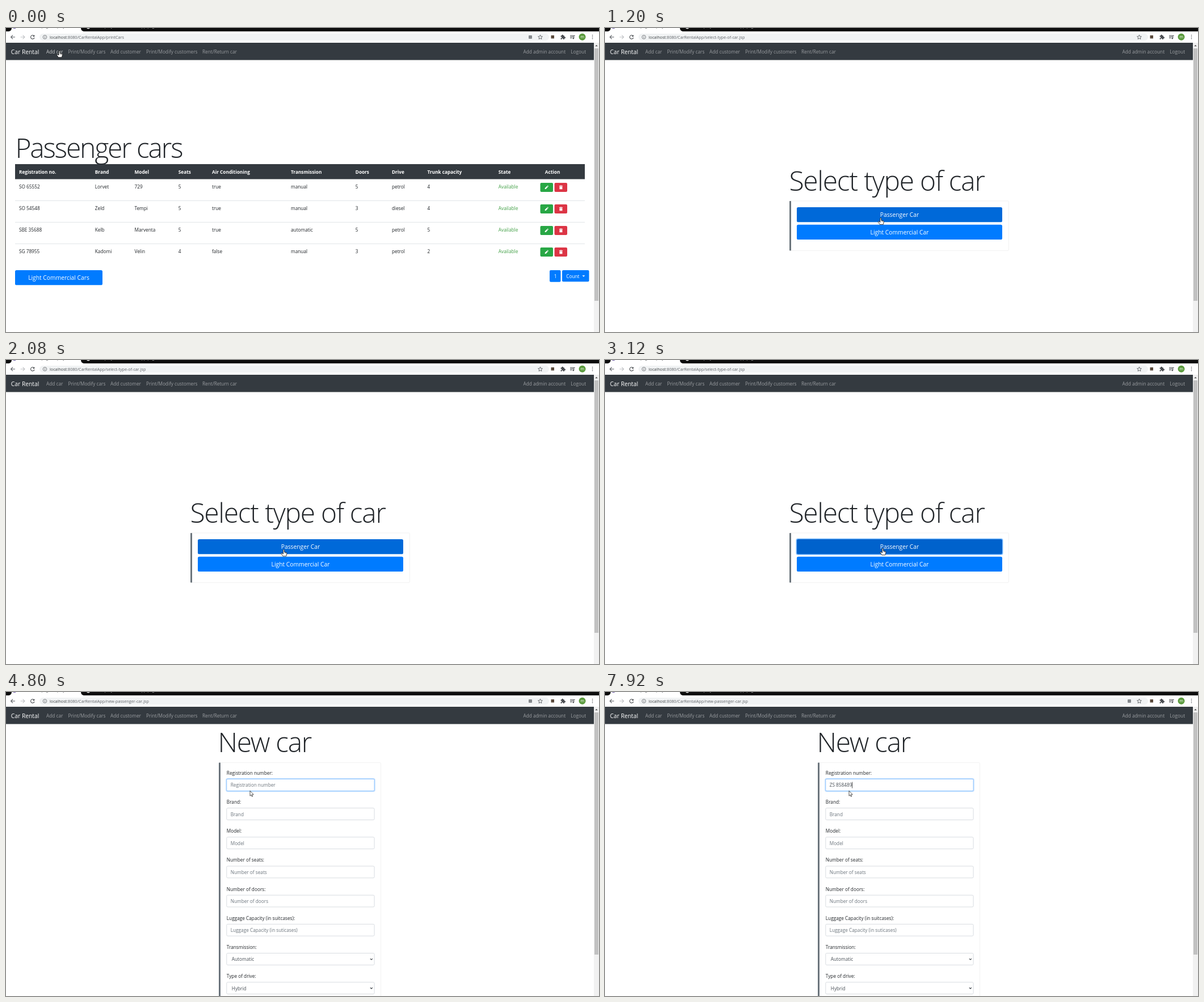
Write an HTML page that moves like this. It is 1045 by 536 pixels and loops after 8000 ms.

```html
<!DOCTYPE html>
<html lang="en">
<head>
<meta charset="utf-8">
<title>Car Rental</title>
<style>
html, body { margin: 0; width: 100%; height: 100%; overflow: hidden; background: #fff; }
svg { display: block; width: 100%; height: 100%; }
text { font: 8.25px "Open Sans", "Noto Sans", sans-serif; fill: #212529; white-space: pre; }
.big { font-size: 48px; font-weight: 300; letter-spacing: -.028em; }
.tight { letter-spacing: -.046em; }
.lg { font-size: 10.3px; }
.url { font-size: 7.2px; }
.bold { font-weight: 700; }
.mid { text-anchor: middle; }
</style>
</head>
<body>
<svg id="stage" viewBox="0 0 1045 536" preserveAspectRatio="none"></svg>
<script>
const LOOP = 8000, STEP = 80;
const BLUE = '#007bff', GREY = '#5f6368', ICON = '#4a4d51';

const rect = (x, y, w, h, fill, r = 0, extra = '') =>
  `<rect x="${x}" y="${y}" width="${w}" height="${h}" rx="${r}" fill="${fill}" ${extra}/>`;
const text = (x, y, str, fill = '#212529', cls = '', extra = '') =>
  `<text x="${x}" y="${y}" class="${cls}" style="fill:${fill}" ${extra}>${str}</text>`;
const line = (d, color, w = 1, extra = '') =>
  `<path d="${d}" fill="none" stroke="${color}" stroke-width="${w}" ${extra}/>`;
const shape = (d, fill, extra = '') => `<path d="${d}" fill="${fill}" ${extra}/>`;
const dot = (x, y, r, fill, extra = '') => `<circle cx="${x}" cy="${y}" r="${r}" fill="${fill}" ${extra}/>`;
const group = (id, body) => `<g id="${id}">${body}</g>`;

function browser() {
  return rect(0, 0, 1045, 6, '#0b0b0b') +
    shape('M5 6Q10 5 10 0H132Q132 5 137 6Z', '#fff') +
    group('favicon', dot(15, -2, 3.2, '#7d6bb0')) +
    text(24, -.6, 'Car Rental, page display', '#3c4043', 'url') +
    dot(145, -2, 3.4, '#fff') +
    text(157, -.6, 'Web project, car rental app page', '#ddd', 'url') +
    rect(0, 6, 1045, 20, '#fff') +
    rect(59, 10, 898, 12, '#f1f3f4', 6) +
    line('M16 16H8.8M12 12.6L8.6 16L12 19.4', GREY, 1.1) +
    line('M25.6 16H32.8M29.6 12.6L33 16L29.6 19.4', '#c0c2c5', 1.1) +
    group('reload', line('M49.4 14A3.3 3.3 0 1 0 50 17', ICON, 1.1) + shape('M50.3 11.9V15.3H46.9Z', ICON)) +
    group('stop', line('M43.6 12.8L50 19.2M50 12.8L43.6 19.2', ICON, 1.1)) +
    dot(68.5, 16, 3.3, 'none', `stroke="${GREY}" stroke-width=".8"`) +
    line('M68.5 15.4V17.9M68.5 13.8V14.7', GREY, .8) +
    text(77, 18.5, '<tspan>localhost</tspan><tspan id="path" fill="#5f6368"></tspan>', '#3c4043', 'url') +
    group('translate', rect(921, 13, 6, 6, '#85898d', 1)) +
    line('M941.5 12.2L942.6 14.8L945.4 15L943.3 16.9L943.9 19.6L941.5 18.2L939.1 19.6L939.7 16.9L937.6 15L940.4 14.8Z', ICON, .8) +
    rect(960.5, 13, 5.5, 5.5, '#5a4a3c') +
    shape('M977.6 13.6H979.4A1.4 1.4 0 1 1 982 13.6H984V15.7A1.4 1.4 0 1 1 984 18.2V20H981.8A1.2 1.2 0 1 0 979.6 20H977.6V17.8A1.2 1.2 0 1 0 977.6 15.7Z', ICON) +
    line('M994 13.3H1000M994 15.5H1000M994 17.7H997.6M1000.8 13V18M1000.4 13.3H1002.6', ICON, 1) +
    dot(999.8, 18.2, 1.2, ICON) +
    dot(1015.5, 15.8, 6, '#5a9a3c') +
    text(1015.5, 18.1, 'm', '#fff', 'url mid') +
    [12.8, 15.8, 18.8].map(y => dot(1033.5, y, .8, ICON)).join('');
}

function navbar() {
  const dim = '#9a9da0';
  const items = [[109.5, 'Print/Modify cars'], [184, 'Add customer'], [247, 'Print/Modify customers'],
    [346, 'Rent/Return car'], [911.5, 'Add admin account'], [995.3, 'Logout']];
  return rect(0, 26, 1036, 30.5, '#343a40') +
    text(8.8, 45.5, 'Car Rental', '#fff', 'lg') +
    text(71, 44.8, 'Add car', dim, '', 'id="addCar"') +
    items.map(([x, s]) => text(x, 44.8, s, dim)).join('') +
    rect(1036, 26, 9, 510, '#f1f1f1') +
    shape('M1038.2 32.3L1040.5 29.8L1042.8 32.3Z', '#505050') +
    rect(1037, 36, 7, 445, '#c1c1c1', 0, 'id="thumb"');
}

function carList() {
  const cols = [23, 156.8, 226.5, 303.8, 363, 502, 615.8, 680, 742.6, 867.8, 949.8];
  const head = 'Registration no.|Brand|Model|Seats|Air Conditioning|Transmission|Doors|Drive|Trunk capacity|State|Action';
  const rows = ['SO 65552|Lorvet|729|5|true|manual|5|petrol|4', 'SO 54548|Zeld|Tempi|5|true|manual|3|diesel|4',
    'SBE 35688|Kelb|Marventa|5|true|automatic|5|petrol|5', 'SG 78955|Kadomi|Velin|4|false|manual|3|petrol|2'];
  const cells = (str, y, fill, cls) => str.split('|').map((s, i) => text(cols[i], y, s, fill, cls)).join('');
  const row = (str, i) => {
    const y = 38 * i;
    return cells(str, 282.5 + y) + text(cols[9], 282.5 + y, 'Available', '#43a047') +
      (i ? line(`M16 ${266.5 + y}H1020`, '#dee2e6', .9) : '') +
      rect(941.5, 273 + y, 22.5, 16, '#28a745', 2) + rect(966.5, 273 + y, 22.5, 16, '#dc3545', 2) +
      `<g transform="translate(0 ${y})">` +
      shape('M949.7 283.9V282.3L953.2 278.8L954.8 280.4L951.3 283.9ZM953.7 278.3L954.5 277.6L956 279.1L955.3 279.9Z', '#fff') +
      shape('M975.4 279.6H980.4V284.3H975.4ZM974.9 278.1H976.7L977.2 277.5H978.6L979.1 278.1H980.9V279H974.9Z', '#fff') + '</g>';
  };
  return text(16.5, 229.2, 'Passenger cars', '#212529', 'big tight') +
    rect(16, 240, 1004, 26.5, '#343a40') + cells(head, 257, '#fff', 'bold') + rows.map(row).join('') +
    rect(16, 427, 154, 26.3, BLUE, 2.6) + text(93, 444.4, 'Light Commercial Cars', '#fff', 'lg mid') +
    rect(958, 427, 19.5, 20.7, BLUE, 2) + text(968, 440.6, '1', '#fff', 'mid') +
    rect(980, 427, 47.5, 20.3, BLUE, 2) + text(987.2, 440.6, 'Count', '#fff') +
    shape('M1015.4 436.2H1020.4L1017.9 438.8Z', '#fff');
}

// White panel with a thick grey left edge
const card = (x, y, w, h) =>
  rect(x + .5, y, w - .5, h, '#fff', 1.5, 'stroke="#ececec" stroke-width=".7"') + rect(x, y, 3, h, '#6c757d', .8);

function typeChoice() {
  return text(324.5, 287, 'Select type of car', '#212529', 'big') + card(325, 305, 386.5, 87.5) +
    rect(336.5, 314.5, 365, 29.3, '#80bdff', 3.6, 'id="ring"') +
    rect(338, 316, 362, 26.3, BLUE, 2.6, 'id="btnA"') + text(519, 333.4, 'Passenger Car', '#fff', 'lg mid') +
    rect(338, 346.7, 362, 26.3, BLUE, 2.6, 'id="btnB"') + text(519, 364, 'Light Commercial Car', '#fff', 'lg mid');
}

function carForm() {
  const fields = [['Registration number'], ['Brand'], ['Model'], ['Number of seats'], ['Number of doors'],
    ['Luggage Capacity (in suitcases)', 'Luggage Capacity (in suticases)'],
    ['Transmission', 'Automatic', 1], ['Type of drive', 'Hybrid', 1]];
  const field = ([label, value = label, select], i) => {
    const y = 51.17 * i, focus = i === 0;
    return text(388.8, 145.9 + y, label + ':') +
      (focus ? rect(387.3, 151.9, 263.4, 24, '#bfdeff', 3.2) : '') +
      rect(388.8, 153.5 + y, 260.3, 20.8, '#fff', 2, `stroke="${focus ? '#80bdff' : '#ced4da'}" stroke-width=".8"`) +
      text(select ? 397.8 : 395.7, 167.4 + y, value, select ? '#495057' : '#6c757d', '', focus ? 'id="entry"' : '') +
      (select ? line(`M641.9 ${163 + y}L643.9 ${165 + y}L645.9 ${163 + y}`, '#343a40', 1.1) : '');
  };
  return text(373.5, 106, 'New car', '#212529', 'big') + card(375, 124.6, 285.5, 460) +
    fields.map(field).join('') + rect(0, 158.6, .8, 11, '#222', 0, 'id="caret"');
}

// Both pointers have their tip at 0,0
const hand = shape('M-1 .8Q0 -.6 1 .8V4.6L4.6 5.4Q5.6 5.8 5.4 7.2L4.4 11.8H-1.6L-4.4 7.6Q-4.6 6.2 -3.2 6.4L-1 8Z', '#fff',
    'stroke="#111" stroke-width=".8" stroke-linejoin="round"') + line('M1.9 5.2V7M3.5 5.4V7.2', '#111', .5);
const arrow = shape('M0 0V9L2 7.2L3.4 10.3L4.8 9.7L3.4 6.7H6.3Z', '#fff', 'stroke="#111" stroke-width=".7" stroke-linejoin="round"');

document.getElementById('stage').innerHTML = rect(0, 0, 1045, 536, '#fff') + group('list', carList()) +
  group('choice', typeChoice()) + group('form', carForm()) + browser() + navbar() +
  group('pointer', group('hand', hand) + group('arrow', arrow));

const el = id => document.getElementById(id);
const show = (id, on) => el(id).setAttribute('visibility', on ? 'inherit' : 'hidden');
const between = (t, a, b) => t >= a && t < b;

const moves = [[0, 94, 40], [160, 94, 40], [240, 94, 43.7], [640, 94, 43.7], [960, 452, 292], [1120, 482, 325],
  [1360, 497, 362], [1520, 494, 345], [1600, 493, 323.7], [1840, 495, 287], [1920, 495, 287], [2080, 489.5, 334],
  [2240, 489.5, 334], [2320, 489.5, 336.5], [2400, 489.5, 336.5], [2480, 489.5, 334], [3040, 489.5, 334],
  [3120, 489.5, 332], [3440, 489, 329.3], [3600, 489, 329.3], [4160, 428, 171], [4320, 428, 171],
  [4560, 430, 174.2], [LOOP, 430, 174.2]];
const keys = [[5760, 'Z'], [6000, 'S'], [6160, ' '], [6880, '8'], [7120, '5'], [7360, '8'], [7520, '4'], [7680, '8'], [7920, '9']];

function position(t) {
  const i = moves.findIndex(m => m[0] > t);
  const [t0, x0, y0] = moves[i - 1], [t1, x1, y1] = moves[i];
  const k = (t - t0) / (t1 - t0), e = k * k * (3 - 2 * k);
  return [x0 + (x1 - x0) * e, y0 + (y1 - y0) * e];
}

// Button colour eased over 150 ms in and out of each hover span
function hoverColor(t, spans) {
  const k = Math.max(0, ...spans.map(([a, b]) => Math.min(1, (t - a) / 150, 1 - (t - b) / 150)));
  return `rgb(0,${Math.round(123 - 18 * k)},${Math.round(255 - 38 * k)})`;
}

function draw(t) {
  const page = t < 320 ? 'list' : t < 3440 ? 'choice' : 'form';
  ['list', 'choice', 'form'].forEach(p => show(p, p === page));
  const file = t < 160 ? 'printCars' : t < 3200 ? 'select-type-of-car.jsp' : 'new-passenger-car.jsp';
  el('path').textContent = ':8080/CarRentalApp/' + file;
  const loading = between(t, 160, 720) || between(t, 3200, 3520);
  show('reload', !loading);
  show('stop', loading);
  show('favicon', !between(t, 3200, 3440));
  show('translate', t < 240 || t >= 3440);
  el('thumb').setAttribute('height', page === 'form' ? 427 : 445);
  el('addCar').style.fill = t < 720 ? '#cccecf' : '#9a9da0';

  const pressed = between(t, 3120, 3440);
  show('ring', page === 'choice' && pressed);
  el('btnA').setAttribute('fill', pressed ? '#0062cc' : hoverColor(t, [[1040, 1280], [1600, 1680], [1920, 3440]]));
  el('btnB').setAttribute('fill', hoverColor(t, [[1280, 1600]]));

  const typed = keys.filter(k => k[0] <= t).map(k => k[1]).join('');
  const entry = el('entry');
  entry.textContent = typed || 'Registration number';
  entry.style.fill = typed ? '#495057' : '#6c757d';
  el('caret').setAttribute('x', 395.6 + (typed ? entry.getComputedTextLength() : 0));
  const blink = between(t, 3920, 4400) || between(t, 4800, 5280) || between(t, 6640, 6880);
  show('caret', page === 'form' && !blink);

  const [x, y] = position(t);
  const link = t < 720 || between(t, 1040, 1760) || between(t, 2000, 3440);
  el('pointer').setAttribute('transform', `translate(${x} ${y})`);
  show('hand', link);
  show('arrow', !link);
}

const start = performance.now();
function tick() {
  const t = (performance.now() - start) % LOOP;
  draw(Math.floor(t / STEP) * STEP);
  requestAnimationFrame(tick);
}
tick();
</script>
</body>
</html>
```
